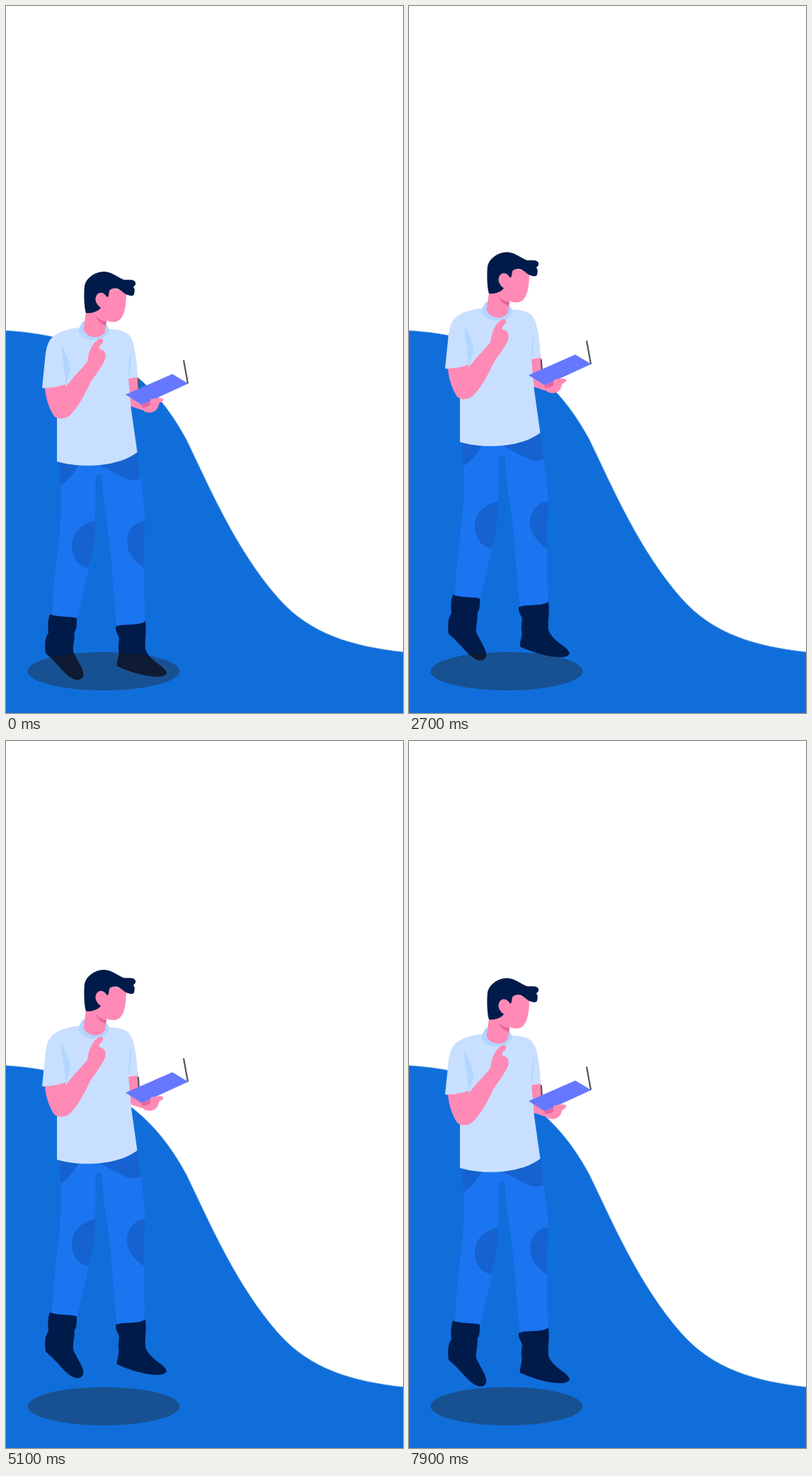
Write an HTML page with a canvas that moves like this. It is 561 by 998 pixels and loops after 8 s.

```html
<!DOCTYPE html>
<html lang="en">
<head>
<meta charset="utf-8">
<title>Floating reader</title>
<style>
  html, body { margin: 0; width: 100%; height: 100%; overflow: hidden; background: #fff; }
  canvas { display: block; width: 561px; height: 998px; }
</style>
</head>
<body>
<canvas id="stage"></canvas>
<script>
const W = 561, H = 998;
const LOOP = 8000, STEP = 100;
const PEAK = 5925, SPEED = 0.0102; // turning point in ms, px per ms

const SKIN = '#ff8ab5', SKIN_DARK = '#e8649f';
const NAVY = '#001b49';
const SHIRT = '#c9dfff', SHIRT_DARK = '#b1d6ff';
const PANTS = '#1b75f1', PANTS_DARK = '#1562d0';
const HILL = '#106edb', BOOK = '#6678ff', ROD = '#53565c';

const canvas = document.getElementById('stage');
const ctx = canvas.getContext('2d');
const dpr = window.devicePixelRatio || 1;
canvas.width = W * dpr;
canvas.height = H * dpr;

const shape = (color, d) => ({ color, path: new Path2D(d) });
const rod = (d) => ({ color: ROD, path: new Path2D(d), line: 2.2 });

const ridge = 'M-2 458 L0 458 C110 465 197 503 255 612 C287 678 325 768 385 836 C430 887 490 904 563 912';
const hillEdge = new Path2D(ridge);
const hill = new Path2D(ridge + ' V1000 H-2 Z');

const legs = [
  shape(PANTS, 'M75 638 C79 690 79 720 74 760 C69 800 66 830 65 861 L100 866 C112 815 126 770 126.500 700 L126.500 667 C126.500 659 136 659 136 667 C136 700 146 740 149 785 C151 815 154 850 157 876 L196 871 L195 790 C195 770 197 740 196 715 C194 690 189 660 186 626 Z'),
  shape(PANTS_DARK, 'M75 640 L104 646 C96 660 88 670 77 677 Z'),
  shape(PANTS_DARK, 'M131 648 L186 628 L190 667 C174 675 162 662 131 648 Z'),
  shape(PANTS_DARK, 'M126 727 C105 731 93 745 93 762 C93 780 103 790 116 793.500 C123 770 126 750 126 727 Z'),
  shape(PANTS_DARK, 'M196.500 727 C180 728 171 743 171 756 C171 772 182 785 195 793 C195 770 196 750 196.500 727 Z'),
  shape(NAVY, 'M62 858.500 C74 863 88 861 100 864 C100 875 100 880 96.500 884 C98 890 94 903 95 911 C99 922 108 932 109.500 943 C109 949 106 952 98 951 C84 947 74 928 56 914 C55 905 54 892 60 885 C59 875 59 866 62 858.500 Z'),
  shape(NAVY, 'M197 868.500 C199 885 196 892 197 908 C203 925 224 931 227 941 C226 946 218 947.500 208 946.500 C190 945 170 938 157 932 C155 926 161 920 159 908 C158 900 162 893 158 888 C155 882 155 880 155 876 C168 871 185 876 197 868.500 Z')
];

const farArm = [
  shape(SKIN, 'M172 522 L186 520 L188 548 L196 562 L203 573 C190 570 183 567 176 565 Z')
];

const torso = [
  shape(SHIRT, 'M105 454 C90 455 75 459 66 467 C58 474 56 487 55 500 L51 539 C58 541 66 539 72 538 L72 643 C106 653 158 651 185.500 630 L177 570 L173 526 L186 524 C185 505 184 492 180 477 C176 463 170 457 146 456 Z'),
  shape(SHIRT_DARK, 'M78 477 C84 490 92 505 91 515 L84 538 C85 515 78 500 78 477 Z'),
  shape(SHIRT_DARK, 'M177 485 C175 499 171 512 174 525 C175 512 178 500 177 485 Z')
];

const head = [
  shape(SHIRT_DARK, 'M109 445 C104 451 102 457 103 461 C108 468 115 471 121 472 L135 470 C141 467 145 462 146 458 C145 455 144 452 141 449 Z'),
  shape(SKIN, 'M113 432 L109.500 456 C114 470 134 471 140 460 L142 445 L146 425 L125 420 Z'),
  shape(SKIN_DARK, 'M127 438 C133 444 138 445 142 445 L141 451 C135 449 130 446 127 438 Z'),
  shape(SKIN, 'M127 404 L146 397 L170 403 C170 425 167 446 152 446 C147 446 143 445 140 442 L127 438 Z'),
  shape(NAVY, 'M113 433.500 C110 424 110 404 111 395 C114 382 128 374.500 140 375 C151 376 159 384 167 386.500 C174 387 181 385 183 390.500 C184 394.500 180 395.500 180 397 C182.500 399 182 404 180.500 408 C178 410 172 408.500 168 406 C163 402 159 398.500 154 398.500 C150 398.500 147 400 146 402 L145 408 C144.500 411 143 411.500 142 410 C140 406 136 404 132 405 C126 407 125 416 129 421 C131 424 133 425 134 426 C129 432 121 434 113 433.500 Z')
];

const nearArm = [
  shape(SKIN, 'M55 539 C56 555 62 570 68 579 C73 584 85 584 92 576 C102 566 112 547 119 532 C126 521 134 512 140 499 C142 491 140 486 132 484 C130 480 136 477 137 474 C138 470 135 468 130 471 C122 476 117 487 115 502 C105 514 95 524 84 538 L84 534 C76 537 65 539 55 539 Z')
];

const book = [
  rod('M251 500 L257 533'),
  rod('M186.800 526 L187.800 541'),
  shape(SKIN, 'M186 558 L196 572 C205 575 213 572 215 563 L205 555 Z'),
  shape(BOOK, 'M169 548.500 L235 519.500 L257.500 533 L192 563 Z'),
  shape(SKIN_DARK, 'M190 561 L193 563 L204 558 C206 564 200 567 193 567 Z'),
  shape(SKIN, 'M205 555 C212 553 221 552 222.500 555.500 C222 559 218 559 216 562 C215 570 209 574 203 574 C197 574 193 571 193 568 C198 565 203 566 204 563 C206 559 202 558 205 555 Z')
];

const figure = [...legs, ...farArm, ...torso, ...head, ...nearArm, ...book];

function paint({ color, path, line }) {
  if (line) {
    ctx.strokeStyle = color;
    ctx.lineWidth = line;
    ctx.stroke(path);
  } else {
    ctx.fillStyle = color;
    ctx.fill(path);
  }
}

function draw(t) {
  const rise = SPEED * (PEAK - Math.abs(t - PEAK));
  ctx.setTransform(dpr, 0, 0, dpr, 0, 0);
  ctx.fillStyle = '#fff';
  ctx.fillRect(0, 0, W, H);

  ctx.fillStyle = HILL;
  ctx.fill(hill);
  ctx.strokeStyle = 'rgba(150, 185, 225, 0.7)';
  ctx.lineWidth = 1;
  ctx.stroke(hillEdge);

  ctx.save();
  ctx.translate(0, -rise);
  figure.forEach(paint);
  ctx.restore();

  // the shadow also darkens the boots
  ctx.fillStyle = 'rgba(42, 28, 8, 0.35)';
  ctx.beginPath();
  ctx.ellipse(138, 939, 107.500, 27, 0, 0, Math.PI * 2);
  ctx.fill();
}

const start = performance.now();
function tick() {
  const t = (performance.now() - start) % LOOP;
  draw(Math.floor(t / STEP) * STEP);
  requestAnimationFrame(tick);
}
tick();
</script>
</body>
</html>
```
